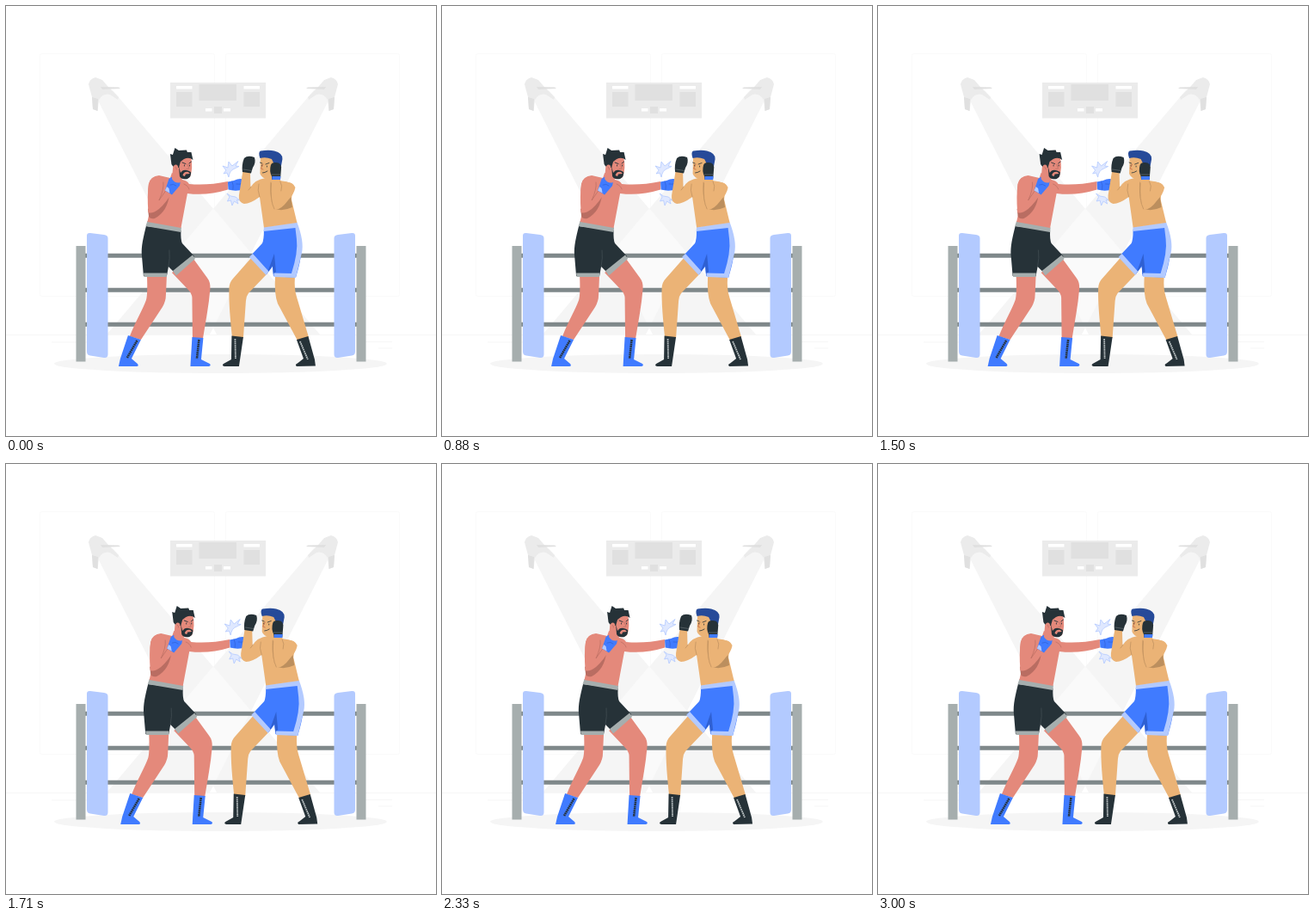
An HTML page that plays this animation: 500x500 px, repeating every 3040 ms.

```html
<!DOCTYPE html>
<html lang="en">
<head>
<meta charset="utf-8">
<title>Boxing match</title>
<style>
html, body { margin: 0; width: 100%; height: 100%; overflow: hidden; background: #fff; }
svg { display: block; width: 100vw; height: 100vh; }
.line { fill: none; stroke-linecap: round; stroke-linejoin: round; }
.lace { fill: none; stroke-width: 2.6; stroke-dasharray: 1.8 .6; }
.pink { fill: #e4897b; }
.pinkShade { fill: #b96d62; }
.tan { fill: #ebb376; }
.tanShade { fill: #bc8f5e; }
.dark { fill: #263238; }
.blue { fill: #407bff; }
.pale { fill: #b3caff; }
.gray { fill: #a6aeae; }
</style>
</head>
<body>
<svg viewBox="0 0 500 500">
  <defs>
    <g id="lamp">
      <path fill="#ebebeb" d="M96 91Q97 85 104 83L112 86L118 93L131 106L130 109L121 103Q113 101 108 109L106.500 122L101 120L100 106Z"/>
      <path fill="#e0e0e0" d="M110 94L131 94.500L133 96L112 97ZM100 106L107 108L106.500 122L101 120Z"/>
    </g>
    <path id="beam" d="M105 106L124 98L365 382H245Z"/>
    <g id="corner">
      <rect class="gray" x="81.500" y="279" width="11" height="134.500"/>
      <path class="pale" d="M94 267Q94 263.500 98 264L114 266Q118.500 266.500 118.500 270V405Q118.500 409.500 114 409L98 406.500Q94 406 94 402Z"/>
    </g>
  </defs>

  <!-- hall -->
  <g fill="none" stroke="#fafafa">
    <rect x="39.500" y="55.500" width="203" height="282" rx="2"/>
    <rect x="255.500" y="55.500" width="202" height="282" rx="2"/>
  </g>
  <path stroke="#f2f2f2" stroke-width=".7" d="M0 382.500H500M53 391H94M417 390.500H449M433 398H449"/>
  <g fill="#f5f5f5">
    <use href="#beam"/>
    <use href="#beam" transform="matrix(-1 0 0 1 482 0)"/>
    <path fill="#fafafa" d="M241 235L197 287L241 374L285 287Z"/>
    <ellipse cx="249.500" cy="416" rx="193.500" ry="11"/>
  </g>
  <use href="#lamp"/>
  <use href="#lamp" transform="matrix(-1 0 0 1 482 0)"/>
  <path fill="#ebebeb" d="M191 89H302V130.500H191Z"/>
  <path fill="#e0e0e0" d="M224.500 91H268V110H224.500ZM198 100H216.500V117H198ZM276.500 100H295V117H276.500ZM242 117H251V125H242Z"/>
  <path fill="#fff" d="M198 93H216.500V96.500H198ZM276.500 93H295V96.500H276.500ZM232 119H239.500V122.500H232ZM253 119H261V122.500H253Z"/>

  <!-- ring -->
  <path stroke="#7f888a" stroke-width="5" d="M92 290.300H408M92 330.300H408M92 370.300H408"/>
  <use href="#corner"/>
  <use href="#corner" transform="matrix(-1 0 0 1 500 0)"/>

  <g id="fighters">
    <!-- impact -->
    <g fill="#dfe8ff" stroke="#b3caff" stroke-width=".8" stroke-linejoin="round">
      <path d="M259 199L257 194L253 195L256 191L252 186L258 188L259 181L263 186L270 180.500L267 186L271 186.500L266 189Q260 191 259 199Z"/>
      <path d="M257 218L260 222L257.500 227L261.500 226L263 232L265.500 227L270 230L268.500 225.500L272 226L267 222Q261 222 257 218Z"/>
    </g>

    <!-- left fighter -->
    <path class="pink" d="M164 313H187L186 336Q186 343 182 350L157 388L144 384C151 366 159 353 163 342Q165 335 164 313Z"/>
    <path class="pink" d="M193 310L218 294L234 316Q238 321 237.500 329C236 348 232 368 229 387H217L216.500 339Q216 334 212 330Z"/>
    <path class="blue" d="M142 383L157 388L146 410L153 416Q155 419 152 419H131L133 410Z"/>
    <path class="blue" d="M216.500 385L229.500 386L227 411L237 416Q239 418 236 419H214.500L215 410Z"/>
    <path class="lace" stroke="#263238" d="M152.500 389L141 409M224.500 388L222 410"/>
    <path class="dark" d="M163 256C160 268 157 280 158 290L160 314H187L189 303L197 311L219 291L205 276Q203 272 203.500 261Z"/>
    <path class="line" stroke="#4b565b" stroke-width=".6" d="M190 284Q191 293 189 303"/>
    <path class="gray" d="M160 310.500H187V315L160.500 315ZM194 308L217 289.500L220 294L198 313.500ZM164.500 250L204 257.500L203.500 263L162.500 256Z"/>
    <path class="pink" d="M193 194L203 198L205 202Q211 203 213 207Q234 209 258 204V213.500Q234 221 211 218L203.500 258L164.500 251L168 235Q164 218 166 207Q168 198 178 197L191 200Z"/>
    <path class="pinkShade" d="M165 236L190 219Q188 239 173 247Q167 248 166 244Z"/>
    <path class="pink" d="M166 207Q168 198 178 198Q184 201 183 212L180 223L187 212L193 217Q187 228 178 236Q170 242 165.500 240Q164 220 166 207Z"/>
    <path class="line" stroke="#b96d62" stroke-width=".7" d="M183 205Q184 213 178 226L187 213M207 207Q212 209 213 213"/>
    <path class="blue" d="M189.500 201Q194 197 199 199.500L203 204L202 209L193 219.500L185 214.500Z"/>
    <path class="pale" d="M187 210L189.500 212L190.500 217.500L185 214.500Z"/>
    <path class="blue" d="M258 204.500L265 203Q272 199.500 277 202Q279 207 277 213Q268 216 258.500 213.500Z"/>
    <path class="line" stroke="#2c5ccc" stroke-width=".6" d="M263 204Q265 208 264 213.500M268 207Q272 208 275 206M191 208Q195 206 198 209"/>
    <path class="pink" d="M195 179L215 175Q218 189 214 199Q208 203 203 200L203 205Q197 207 193 201Z"/>
    <path class="dark" d="M192.500 184L191 172L194 173L196.500 165L201 168L210 167.500L211 170L215.500 170L217.500 179Q213 175 207 178L203 181L201 188Q195 189 192.500 184Z"/>
    <path class="dark" d="M201 186L203 194Q206 189 212 191.500L215 193Q216 198 211 201Q204 202 202 198Z"/>
    <path class="pink" d="M205.500 197Q207 192 212 193L214 195L209 195.500L208 198Z"/>
    <ellipse class="pink" cx="197.500" cy="188" rx="2.700" ry="3.500"/>
    <path class="line" stroke="#263238" stroke-width=".9" d="M205 182L209 183.500M213 183L215.500 181M207.500 185v1M213.500 185v1"/>
    <path class="line" stroke="#b96d62" stroke-width=".7" d="M211 184L213 189L210 189.500M197 187Q198 187 198.500 190"/>

    <!-- right fighter -->
    <path class="tan" d="M286 292L304 311L282 334Q279 338 279 343L276 386L263 385C261 365 259 345 259.500 328Q260 321 264 317Z"/>
    <path class="tan" d="M313 314L336 315Q335 329 338 338L352 385L339 389L316 346Q312 336 313 314Z"/>
    <path class="dark" d="M262.500 383.500L276 385L271 419H254Q250.500 418 253 416L262 411Z"/>
    <path class="dark" d="M338 388L351.500 384L359 411L360 418.500L338 419Q335.500 417 339 415.500L346 410Z"/>
    <path class="lace" stroke="#b9c0c2" style="stroke-width:1.800" d="M266.500 387L267 410M342 390L351 411"/>
    <path class="blue" d="M300 260L339 255C346 275 345 290 337 316L311 314L310 303L303 312L284 291L298 276Q300 272 300 260Z"/>
    <path fill="#2f60d2" d="M312 288L314 309L311 312L310 302L303 312L307 302Z"/>
    <path class="pale" d="M300 257L338.500 251.500Q347 274 344 287L337 316L311.500 315V310.500L332 311Q340 286 338 271L336.500 258L299.500 262ZM287 288L305.500 308.500L302.500 313L283 292Z"/>
    <path class="tan" d="M302 196L313 196L312 203Q329 203 334 208L332 225L338.500 252L300 257.500L295 222Q284 230 277 230Q270 228 271 220L275.500 192L284 194L284.500 211Q289 202 302 200Z"/>
    <path class="line" stroke="#bc8f5e" stroke-width=".7" d="M285 210Q284 212 282 214M294 207Q292 214 295 222M308 205Q307 219 310 231"/>
    <path class="tanShade" d="M313 236Q324 231 331 220L333 234Q322 239 313 236Z"/>
    <path class="tan" d="M309 202H319L320 205Q333 203 336.500 211Q335 219 328 226Q320 237 313 237Q308 234 308.500 218Z"/>
    <path class="line" stroke="#bc8f5e" stroke-width=".7" d="M319 204Q322 209 320 215M308.500 206Q307 226 312 236"/>
    <path class="tan" d="M296 176H314L316 187L312 197L305 202Q297 200 295.500 195Z"/>
    <path fill="#264a99" d="M295.500 177Q293 170 296 168.500Q306 167 312 168.500Q322 171 321.500 178L320 186Q315 188 312 184L309 178Q302 175 295.500 177Z"/>
    <path class="line" stroke="#263238" stroke-width=".8" d="M295.500 182L298 183M302 184L306 182.500M297.500 185v1M303.500 186v1M298.500 194Q301 194 304 192"/>
    <path class="line" stroke="#c46a48" stroke-width=".8" d="M299 184L296.500 189L299 190"/>
    <path class="dark" d="M277 177Q281 173 289 176Q291 182 287 188L285 194.500L275 193Q274 184 277 177Z"/>
    <path class="dark" d="M308 185Q309 181.500 314 182Q321 182 320 190L319 202H309.500L309 198Q306 192 308 185Z"/>
    <path class="blue" d="M309.500 198H319.500L319 202H309.500Z"/>
    <path class="line" stroke="#6d777b" stroke-width=".6" d="M276 190L285.500 191.500M309 196H319"/>
  </g>
</svg>
<script>
const fighters = document.getElementById("fighters");
const shake = [0, -1, 2, -4, 4, -4, 4, -4, 2, -1, 0];
const LOOP = 3040, STEP = 300, LEAD = 22;

function draw() {
  const pos = ((performance.now() % LOOP + LEAD) % (STEP * 10)) / STEP;
  const i = Math.floor(pos);
  const x = shake[i] + (shake[i + 1] - shake[i]) * (pos - i);
  fighters.setAttribute("transform", `translate(${x.toFixed(3)} 0)`);
  requestAnimationFrame(draw);
}
draw();
</script>
</body>
</html>
```
